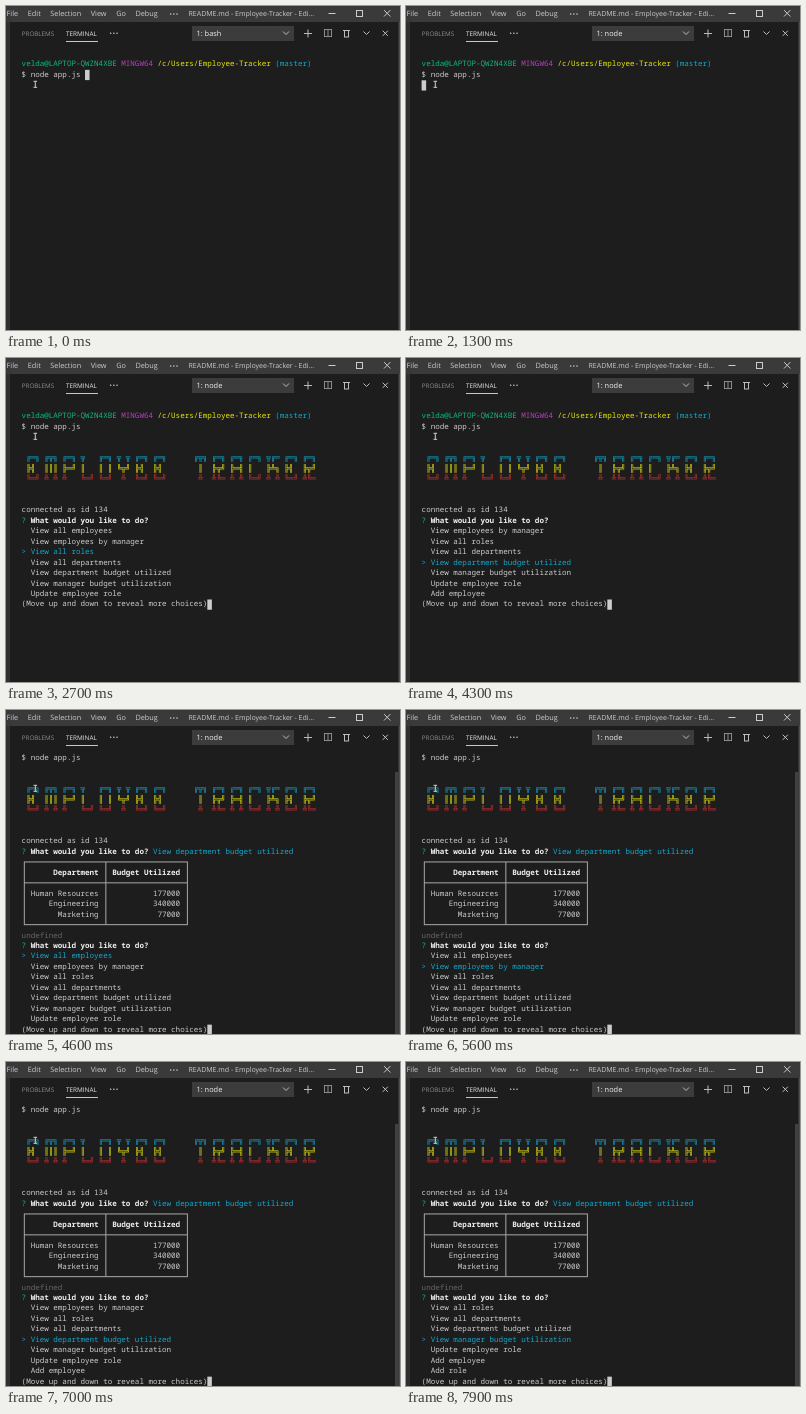
An HTML page with a canvas for the animation above (8 s loop, 394x324 px).

```html
<!DOCTYPE html>
<html lang="en">
<head>
<meta charset="utf-8">
<title>Terminal</title>
<style>
html, body { margin: 0; width: 394px; height: 324px; overflow: hidden; background: #1d1d1e; }
canvas { display: block; width: 394px; height: 324px; }
</style>
</head>
<body>
<canvas id="stage"></canvas>
<script>
const LOOP = 8000, W = 394, H = 324;
const COL = 4.53, ROW = 10.45, LEFT = 15.6, TOP = 57.6;
const BAR = 16, TABS = 27.5;
const MONO = '"Noto Sans Mono", "DejaVu Sans Mono", monospace';
const BOX = '"DejaVu Sans Mono", monospace';
const UI = '"Open Sans", "Noto Sans", sans-serif';
const TEXT = '#cccccc', WHITE = '#f0f0f0', GREEN = '#0dbc79', CYAN = '#11a8cd',
      YELLOW = '#e5e510', RED = '#cd3131', MAGENTA = '#bc3fbc', GREY = '#666666';
const START = 500, PROMPT = 1500, ENTER = 4500;

const choices = ['View all employees', 'View employees by manager', 'View all roles',
  'View all departments', 'View department budget utilized', 'View manager budget utilization',
  'Update employee role', 'Add employee', 'Add role'];
const budgets = { 'Human Resources': '177000', Engineering: '340000', Marketing: '77000' };

const letters = {
  E: ['╔═╗', '╠╣ ', '╚═╝'], M: ['╔╦╗', '║║║', '╩ ╩'], P: ['╔═╗', '╠═╝', '╩  '],
  L: ['╦  ', '║  ', '╚═╝'], O: ['╔═╗', '║ ║', '╚═╝'], Y: ['╦ ╦', '╚╦╝', ' ╩ '],
  T: ['╔╦╗', ' ║ ', ' ╩ '], R: ['╔═╗', '╠╦╝', '╩╚═'], A: ['╔═╗', '╠═╣', '╩ ╩'],
  C: ['╔═╗', '║  ', '╚═╝'], K: ['╦╔═', '╠╩╗', '╩ ╩']
};

const canvas = document.getElementById('stage');
const ctx = canvas.getContext('2d');
const dpr = window.devicePixelRatio || 1;
canvas.width = W * dpr;
canvas.height = H * dpr;
ctx.scale(dpr, dpr);
ctx.textRendering = 'geometricPrecision';

function rect(color, x, y, w, h) {
  ctx.fillStyle = color;
  ctx.fillRect(x, y, w, h);
}

function line(x1, y1, x2, y2) {
  ctx.beginPath();
  ctx.moveTo(x1, y1);
  ctx.lineTo(x2, y2);
  ctx.stroke();
}

// Draws text centred on y and returns its right end
function label(text, x, y, size, color = TEXT) {
  ctx.font = `${size}px ${UI}`;
  ctx.fillStyle = color;
  ctx.fillText(text, x, y + size * .36);
  return x + ctx.measureText(text).width;
}

function dots(x, y) {
  for (let i = 0; i < 3; i++) rect(TEXT, x + i * 3.2, y - .6, 1.3, 1.3);
}

function cross(x, y, r) {
  line(x - r, y - r, x + r, y + r);
  line(x - r, y + r, x + r, y - r);
}

function chevron(x, y) {
  line(x - 3, y - 1.5, x, y + 1.5);
  line(x, y + 1.5, x + 3, y - 1.5);
}

const rowY = row => TOP + row * ROW;
const colX = col => LEFT + col * COL;

function put(text, row, col) {
  [...text].forEach((ch, i) => {
    if (ch !== ' ') ctx.fillText(ch, colX(col + i), rowY(row) + 2.7);
  });
}

// Writes spans of [color, text, bold] on the character grid
function write(row, ...spans) {
  let col = 0;
  for (const [color, text, bold] of spans) {
    ctx.fillStyle = color;
    ctx.font = `${bold ? 'bold ' : ''}7.55px ${MONO}`;
    put(text, row, col);
    col += text.length;
  }
}

function cursor(row, col) {
  rect(TEXT, colX(col), rowY(row) - 4.2, COL, ROW - .2);
}

function banner(row) {
  ctx.font = `bold 7.52px ${BOX}`;
  [CYAN, YELLOW, RED].forEach((color, i) => {
    const word = s => [...s].map(c => letters[c][i]).join(' ');
    ctx.fillStyle = color;
    put(word('EMPLOYEE'), row + i, 1);
    put(word('TRACKER'), row + i, 38);
  });
}

function table(row) {
  const [left, mid, right] = [0, 18, 36].map(c => colX(c + .6));
  const [top, rule, bottom] = [0, 2, 6].map(r => rowY(row + r) + .3);
  ctx.strokeStyle = '#a8a8a8';
  ctx.strokeRect(left, top, right - left, bottom - top);
  line(left, rule, right, rule);
  line(mid, top, mid, bottom);
  const cells = (r, a, b, color, bold) =>
    write(r, [color, `  ${a.padStart(15)}   ${b.padStart(15)}`, bold]);
  cells(row + 1, 'Department', 'Budget Utilized', WHITE, true);
  Object.entries(budgets).forEach(([a, b], i) => cells(row + 3 + i, a, b, TEXT));
}

function question(row, answer = '') {
  write(row, [GREEN, '? '], [WHITE, 'What would you like to do? ', true], [CYAN, answer]);
}

function menu(row, selected) {
  question(row);
  const first = Math.max(0, selected - 3);
  for (let i = 0; i < 7; i++) {
    const on = first + i === selected;
    write(row + 1 + i, [on ? CYAN : TEXT, (on ? '> ' : '  ') + choices[first + i]]);
  }
  write(row + 8, [TEXT, '(Move up and down to reveal more choices)']);
  cursor(row + 8, 41);
}

// Steady key presses that stop at the last choice wanted
function pressed(t, from, every, last) {
  return Math.max(0, Math.min(last, Math.floor((t - from) / every)));
}

function terminal(t) {
  const answered = t >= ENTER;
  ctx.save();
  ctx.beginPath();
  ctx.rect(4, 42, W, H);
  ctx.clip();
  if (answered) ctx.translate(0, -2 * ROW);
  write(0, [GREEN, 'velda@LAPTOP-QWZN4XBE '], [MAGENTA, 'MINGW64 '],
    [YELLOW, '/c/Users/Employee-Tracker '], [CYAN, '(master)']);
  write(1, [TEXT, '$ node app.js']);
  if (t < START) cursor(1, 14);
  else if (t < PROMPT) cursor(2, 0);
  else {
    banner(4);
    write(9, [TEXT, 'connected as id 134']);
    if (answered) {
      question(10, choices[4]);
      table(11);
      write(18, [GREY, 'undefined']);
      menu(19, pressed(t, 5150, 450, 5));
    } else menu(10, pressed(t, PROMPT, 500, 4));
  }
  ctx.restore();
  if (answered) rect('#414142', 389, 62, 3.5, H - 62);
}

function titleBar() {
  const y = 7.6;
  rect('#3a3a3b', 0, 0, W, BAR);
  let x = .6;
  for (const item of ['File', 'Edit', 'Selection', 'View', 'Go', 'Debug'])
    x = label(item, x, y, 7.3) + 9.6;
  dots(164, y + .4);
  label('README.md - Employee-Tracker - Edi...', 182.5, y, 7);
  ctx.strokeStyle = TEXT;
  line(322.5, 7.5, 329.5, 7.5);
  ctx.strokeRect(350.5, 4.5, 6, 6);
  cross(381.2, 7.3, 3.2);
}

function tabBar(t) {
  label('PROBLEMS', 15.8, TABS, 6.25, '#8e8e8e');
  label('TERMINAL', 60, TABS, 6.4, '#e7e7e7');
  rect('#c8c8c8', 60, 35, 32, 1);
  dots(104, TABS - .3);
  rect('#3c3c3d', 186, 20, 102, 15);
  label(t < START ? '1: bash' : '1: node', 190.5, TABS, 7.4, '#f0f0f0');

  ctx.strokeStyle = '#bdbdbd';
  chevron(280, TABS - .5);
  line(298, TABS, 306, TABS);
  line(302, TABS - 4, 302, TABS + 4);
  ctx.strokeRect(338.5, 24.5, 4, 6.5);
  line(337, 24.5, 344, 24.5);
  chevron(360.5, TABS - .5);
  cross(379.3, TABS - .2, 2.6);
  ctx.strokeStyle = '#8c8c8c';
  ctx.strokeRect(318.5, 23.5, 7, 7);
  line(322, 23.5, 322, 30.5);
}

function pointer(x, y) {
  ctx.strokeStyle = '#d0d0d0';
  line(x, y - 3, x, y + 3);
  for (const end of [y - 3, y + 3]) line(x - 1.8, end, x + 1.8, end);
}

function draw() {
  const t = performance.now() % LOOP;
  rect('#1d1d1e', 0, 0, W, H);
  rect('#303031', 0, BAR, 4, H);
  rect('#4c4c4d', 392.5, BAR, 1.5, H);
  titleBar();
  tabBar(t);
  terminal(t);
  pointer(29.3, 78.3);
  requestAnimationFrame(draw);
}
draw();
</script>
</body>
</html>
```
